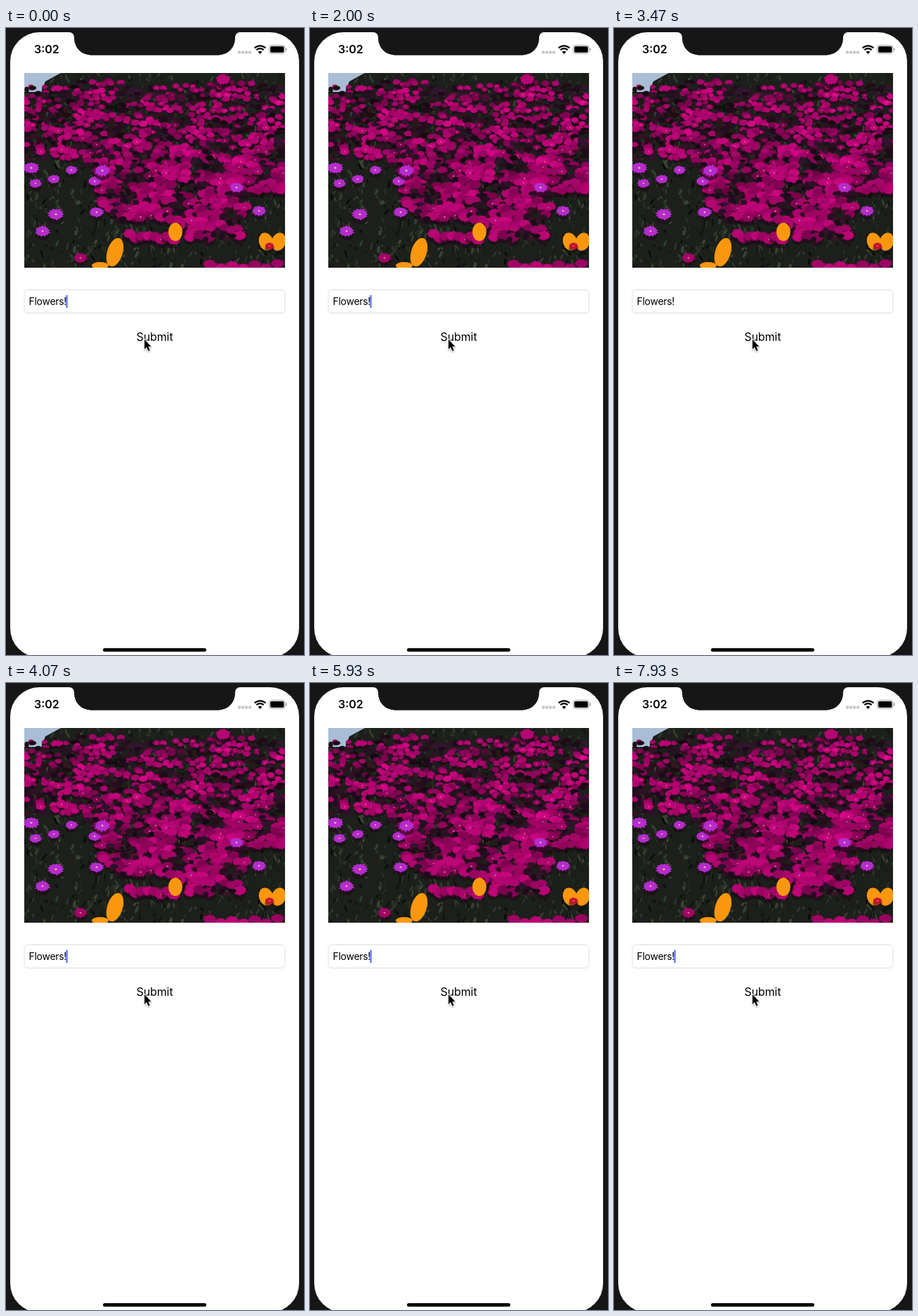
An HTML page with a canvas that plays this animation: 424x892 px, repeating every 8 s.

```html
<!DOCTYPE html>
<html lang="en">
<head>
<meta charset="utf-8">
<title>Photo caption form</title>
<style>
  html, body { margin: 0; width: 100%; height: 100%; overflow: hidden; background: #161616; }
  canvas { display: block; width: 424px; height: 892px; }
</style>
</head>
<body>
<canvas id="stage"></canvas>
<script>
const W = 424, H = 892, LOOP = 8000, FPS = 15;
const FONT = 'Inter, Roboto, sans-serif';
const BEZEL = '#161616';
const PHOTO = { left: 26, top: 64, right: 397, bottom: 341 };
const ratio = window.devicePixelRatio || 1;

function setup(canvas) {
  canvas.width = W * ratio;
  canvas.height = H * ratio;
  const c = canvas.getContext('2d');
  c.scale(ratio, ratio);
  return c;
}

const view = setup(document.getElementById('stage'));
const base = document.createElement('canvas');
const g = setup(base);

let seed = 71;
function rand(min, max) {
  seed = (seed * 1664525 + 1013904223) % 4294967296;
  return min + (max - min) * seed / 4294967296;
}

function fill(path, color) {
  g.fillStyle = color;
  g.fill(path);
}

function roundRect(x, y, w, h, r) {
  const p = new Path2D();
  p.roundRect(x, y, w, h, r);
  return p;
}

function ellipse(x, y, rx, ry, turn = 0) {
  const p = new Path2D();
  p.ellipse(x, y, rx, ry, turn, 0, Math.PI * 2);
  return p;
}

function text(str, x, y, size, weight, spacing = 0) {
  g.font = `${weight} ${size}px ${FONT}`;
  g.letterSpacing = spacing + 'px';
  g.fillStyle = '#000';
  g.fillText(str, x, y);
}

function ramp(a, b, x) {
  const k = Math.min(1, Math.max(0, (x - a) / (b - a)));
  return k * k * (3 - 2 * k);
}

// Flat, ragged flower head with a shadow below it
function flower(x, y, r, color, heart) {
  const p = new Path2D(), spikes = 26, turn = rand(0, 1);
  for (let i = 0; i < spikes; i++) {
    const a = turn + i * Math.PI * 2 / spikes;
    const d = r * (i % 2 ? 0.8 : rand(0.9, 1.15));
    p.lineTo(x + Math.cos(a) * d, y + Math.sin(a) * d * 0.72);
  }
  fill(ellipse(x, y + r * 0.5, r * 0.95, r * 0.7), 'rgba(30,10,24,0.55)');
  fill(p, color);
  if (heart) fill(ellipse(x, y, r * 0.14, r * 0.12), heart);
}

function pinkFlower(x, y, r, light) {
  flower(x, y, r, `hsl(323 94% ${light}%)`, rand(0, 1) < 0.2 && '#e06a86');
}

function drawFoliage() {
  const { left, top, right, bottom } = PHOTO;
  g.fillStyle = '#1c1f1a';
  g.fillRect(left, top, right - left, bottom - top);
  for (let i = 0; i < 1100; i++) {
    const leaf = ellipse(rand(left, right), rand(top, bottom), rand(0.8, 2.2), rand(2, 6), rand(-0.8, 0.8));
    fill(leaf, `hsl(${rand(85, 125)} 13% ${rand(4, 25)}%)`);
  }
  fill(new Path2D('M26 64 H78 L56 76 L50 91 H26 Z'), '#a9bdd6');
}

// Lower edge of the flower bank
function bankEdge(x) {
  return 186 + 88 * ramp(105, 155, x) + 28 * ramp(230, 260, x) - 66 * ramp(328, 350, x);
}

function drawBank() {
  const { left, right } = PHOTO;
  const rows = 42, perRow = 34;
  const spread = (right - left) / perRow;
  for (let row = 0; row < rows; row++) {
    for (let col = 0; col < perRow; col++) {
      const x = left + (col + rand(0, 1)) * spread;
      const y = 82 + 5 * Math.sin(x / 28) + row * 5.4 + rand(-4, 4);
      const mound = Math.sin(x * 0.07 + y * 0.05) + Math.sin(y * 0.2 - x * 0.035);
      const size = rand(4, 6.5) + ramp(80, 290, y) * 4;
      const light = 31 + mound * 3.5 + rand(-7, 7);
      if (y > bankEdge(x)) continue;
      if (rand(-1.9, 0.9) < mound) pinkFlower(x, y, size, light);
      else fill(ellipse(x, y, rand(3, 7), rand(2, 4.5)), `hsl(${rand(300, 340)} 45% ${rand(6, 15)}%)`);
    }
  }
}

function drawBlooms() {
  for (let x = 176; x < 240; x += 9) pinkFlower(x, 297 + rand(-5, 5), 10, rand(30, 39));
  for (let x = 290; x <= 390; x += 16) pinkFlower(x, 338 + rand(-3, 4), 10, rand(30, 39));
  pinkFlower(309, 73, 11, 37);
  pinkFlower(106, 327, 10, 33);

  const purples = [[36, 199], [42, 221], [68, 215], [93, 202], [126, 218], [137, 203],
    [71, 265], [129, 262], [52, 289], [328, 227], [360, 260]];
  for (const [x, y] of purples) flower(x, y, rand(9, 12), '#b52ccb', '#eab0a8');

  const orange = '#fa970f';
  fill(ellipse(155, 319, 11, 21, 0.3), orange);
  fill(ellipse(134, 338, 12, 5), orange);
  fill(ellipse(241, 290, 10, 13), orange);
  for (const side of [-1, 1]) fill(ellipse(379 + side * 9, 304, 10, 13, side * 0.3), orange);
  flower(375, 310, 7, '#c51239', '#f3a326');
}

function drawPhoto() {
  const { left, top, right, bottom } = PHOTO;
  g.save();
  g.beginPath();
  g.rect(left, top, right - left, bottom - top);
  g.clip();
  drawFoliage();
  drawBank();
  drawBlooms();
  g.restore();
}

function drawNotch() {
  const l = 97, r = 326, bottom = 38.7, flare = 7, corner = 24;
  const p = new Path2D();
  p.moveTo(l - flare, 5);
  p.lineTo(l - flare, 6);
  p.arcTo(l, 6, l, 6 + flare, flare);
  p.arcTo(l, bottom, l + corner, bottom, corner);
  p.arcTo(r, bottom, r, bottom - corner, corner);
  p.arcTo(r, 6, r + flare, 6, flare);
  p.lineTo(r + flare, 5);
  fill(p, BEZEL);
}

function drawPhone() {
  g.fillStyle = BEZEL;
  g.fillRect(0, 0, W, H);
  fill(roundRect(6, 6, 411, 889.5, 41.5), '#fff');
  drawNotch();
  fill(roundRect(138, 882.2, 147, 5, 2.5), '#000');
}

function drawStatus() {
  text('3:02', 40, 36.3, 16, 600);
  for (let i = 0; i < 4; i++) fill(roundRect(330 + i * 5, 32.5, 4, 4, 1), '#c4c4c4');

  g.strokeStyle = '#000';
  g.lineWidth = 2.3;
  for (const r of [11, 7.2]) {
    g.beginPath();
    g.arc(361.5, 36.3, r, -Math.PI * 0.75, -Math.PI * 0.25);
    g.stroke();
  }
  fill(new Path2D('M361.5 37 L358.6 34 Q361.5 31.6 364.4 34 Z'), '#000');

  g.strokeStyle = '#a5a5a5';
  g.lineWidth = 1;
  g.stroke(roundRect(374.5, 24.5, 22.5, 12, 3.5));
  fill(roundRect(376, 26, 19.5, 9, 2), '#000');
  fill(roundRect(398, 28.5, 1.5, 4, 1), '#a5a5a5');
}

function drawForm() {
  g.strokeStyle = '#dedede';
  g.lineWidth = 1;
  g.stroke(roundRect(26, 372.5, 371, 33, 5));
  text('Flowers!', 32.5, 394, 14, 400, -0.28);
  g.textAlign = 'center';
  text('Submit', 211.5, 445, 16, 400, -0.1);
  g.textAlign = 'left';
}

function drawPointer() {
  const arrow = new Path2D('M197 443 V457 L200 454 L202.4 459.6 L204.8 458.6 L202.5 453.2 H206.6 Z');
  g.save();
  g.shadowColor = 'rgba(0,0,0,0.35)';
  g.shadowBlur = 2 * ratio;
  g.shadowOffsetY = ratio;
  g.strokeStyle = '#fff';
  g.lineWidth = 2;
  g.lineJoin = 'round';
  g.stroke(arrow);
  g.restore();
  fill(arrow, '#000');
}

// One-second blink: hold, fade out, pause, fade in
function caretAlpha(ms) {
  const p = ((ms + 200) % 1000) / 1000;
  if (p < 0.5) return 1;
  if (p < 0.65) return 1 - (p - 0.5) / 0.15;
  if (p < 0.85) return 0;
  return (p - 0.85) / 0.15;
}

function frame(now) {
  const t = Math.max(now - start, 0) % LOOP;
  const step = Math.floor((t + 4) * FPS / 1000);
  view.drawImage(base, 0, 0, W, H);
  view.globalAlpha = caretAlpha(step * 1000 / FPS);
  view.fillStyle = '#3b68cf';
  view.fillRect(85.5, 380, 2, 18);
  view.globalAlpha = 1;
  requestAnimationFrame(frame);
}

drawPhone();
drawPhoto();
drawStatus();
drawForm();
drawPointer();
const start = performance.now();
frame(start);
</script>
</body>
</html>
```
